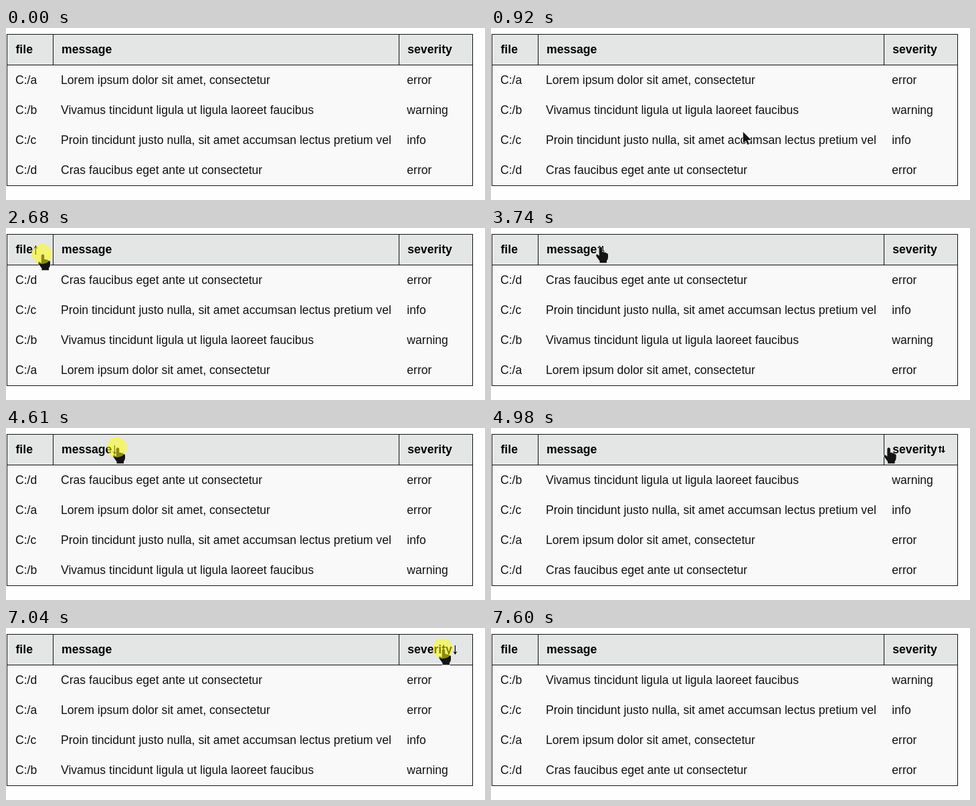
Recreate the animation shown at these times as an HTML page. Size 716 by 258 pixels, loop 7920 ms.

```html
<!DOCTYPE html>
<html lang="en">
<head>
<meta charset="utf-8">
<title>Sortable table</title>
<style>
  html, body { margin: 0; width: 100%; height: 100%; overflow: hidden; background: #fefefe; }
  svg { display: block; }
  text { font: 17.6px "Liberation Sans", Arial, sans-serif; fill: #111; }
  .head text { font-weight: bold; fill: #000; }
  .border { fill: none; stroke: #111; shape-rendering: crispEdges; }
</style>
</head>
<body>
<svg width="716" height="258" viewBox="0 0 716 258">
  <rect x="1" y="9" width="697" height="47" fill="#e4e6e5"/>
  <rect x="1" y="56" width="697" height="181" fill="#f9f9f9"/>
  <path class="border" d="M1.5 9.5H697.5V236.5H1.5ZM1.5 55.5H697.5M70.5 9.5V55.5M587.5 9.5V55.5"/>
  <g class="head" id="head"></g>
  <g id="body"></g>
  <path id="sortIcon"/>
  <g id="cursor">
    <path id="pointer" fill="#141414" stroke="#e8e8e8" stroke-width="1.2" paint-order="stroke"/>
    <circle id="highlight" r="15" fill="#ff0" fill-opacity=".5"/>
  </g>
</svg>
<script>
const LOOP = 7920, STEP = 62.3, ENTER = 550, LEAVE = 7600;

const columns = [
  { title: 'file', headX: 14.5, x: 14, right: 70, iconX: 40 },
  { title: 'message', headX: 83, x: 82, right: 587, iconX: 158 },
  { title: 'severity', headX: 600.3, x: 599.3, right: 697, iconX: 667 }
];
const data = [
  ['C:/a', 'Lorem ipsum dolor sit amet, consectetur', 'error'],
  ['C:/b', 'Vivamus tincidunt ligula ut ligula laoreet faucibus', 'warning'],
  ['C:/c', 'Proin tincidunt justo nulla, sit amet accumsan lectus pretium vel', 'info'],
  ['C:/d', 'Cras faucibus eget ante ut consectetur', 'error']
];

// press time, release time, column
const clicks = [
  [1430, 1555, 0], [2050, 2178, 0], [2680, 2800, 0], [3240, 3368, 0],
  [3928, 4050, 1], [4610, 4735, 1],
  [5368, 5430, 2], [5930, 5990, 2], [6550, 6610, 2], [7040, 7100, 2]
];

const easeIn = p => p * p;
const easeOut = p => p * (2 - p);
const smooth = p => p * p * (3 - 2 * p);

// time, x, y, easing towards this point
const path = [
  [550, 570, 226],
  [1300, 54, 39, smooth],
  [3540, 54, 39, smooth],
  [3727, 163, 28, smooth],
  [3850, 166, 29, smooth],
  [4735, 166, 29, smooth],
  [4973, 593.5, 29, easeIn],
  [5290, 653, 31, easeOut],
  [7200, 653, 31, smooth],
  [7530, 640, 219, easeIn]
];

const icons = {
  none: 'M3.2 37V30H1L4.2 26.5L7.4 30H5.1V37ZM8 27V34H5.8L9 37.5L12.2 34H9.9V27Z',
  up: 'M3.8 40V29.5L1.2 31.2L4.4 26L7.6 31.2L5 29.5V40Z',
  down: 'M3.8 26V36.5L1.2 34.8L4.4 40L7.6 34.8L5 36.5V26Z'
};
const hand = 'M-1.3 2Q1 -1.5 3.2 2V8Q5 7 6.5 8.7Q8.5 8 9.5 9.7Q12 9.7 12 12.5V16' +
  'Q12 19 10 21V24.3H-.5V21.5L-5.5 14.5Q-6.5 11 -4 11.5L-1.3 13.7Z';
const arrow = 'M0 0V16.5L4 13L6.5 19L9 18L6.5 12H12Z';

const $ = id => document.getElementById(id);

function addText(parent, x, y, content = '') {
  const el = document.createElementNS('http://www.w3.org/2000/svg', 'text');
  el.setAttribute('x', x);
  el.setAttribute('y', y);
  el.textContent = content;
  parent.append(el);
  return el;
}

columns.forEach(c => addText($('head'), c.headX, 38, c.title));
const cells = data.map((_, row) => columns.map(c => addText($('body'), c.x, 84 + row * 45)));

// A repeated click on the same column flips its direction.
function sortState(t) {
  let rows = data, column = -1, descending = false;
  for (const [, release, col] of clicks) {
    if (t < release) break;
    descending = col === column && !descending;
    column = col;
    rows = [...rows].sort((a, b) => a[col] < b[col] ? -1 : a[col] > b[col] ? 1 : 0);
    if (descending) rows.reverse();
  }
  return { rows, column, descending };
}

function cursorAt(t) {
  const time = ENTER + Math.floor((t - ENTER) / STEP) * STEP;
  const i = path.findIndex(k => k[0] > time);
  if (i < 0) return path[path.length - 1].slice(1, 3);
  const [t0, x0, y0] = path[i - 1], [t1, x1, y1, ease] = path[i];
  const p = ease((time - t0) / (t1 - t0));
  return [x0 + (x1 - x0) * p, y0 + (y1 - y0) * p];
}

function render(t) {
  const { rows, column, descending } = sortState(t);
  cells.forEach((line, r) => line.forEach((cell, c) => {
    if (cell.textContent !== rows[r][c]) cell.textContent = rows[r][c];
  }));

  const visible = t >= ENTER && t < LEAVE;
  $('cursor').style.display = visible ? '' : 'none';
  $('sortIcon').style.display = 'none';
  if (!visible) return;

  const [x, y] = cursorAt(t);
  const overHead = y < 56;
  $('cursor').setAttribute('transform', `translate(${x} ${y})`);
  $('pointer').setAttribute('d', overHead ? hand : arrow);
  $('highlight').style.display = clicks.some(([a, b]) => t >= a && t < b) ? '' : 'none';

  if (overHead) {
    const hovered = columns.findIndex(c => x < c.right);
    const icon = hovered !== column ? 'none' : descending ? 'up' : 'down';
    $('sortIcon').setAttribute('d', icons[icon]);
    $('sortIcon').setAttribute('transform', `translate(${columns[hovered].iconX} 0)`);
    $('sortIcon').style.display = '';
  }
}

const start = performance.now();
function tick() {
  render((performance.now() - start) % LOOP);
  requestAnimationFrame(tick);
}
tick();
</script>
</body>
</html>
```
